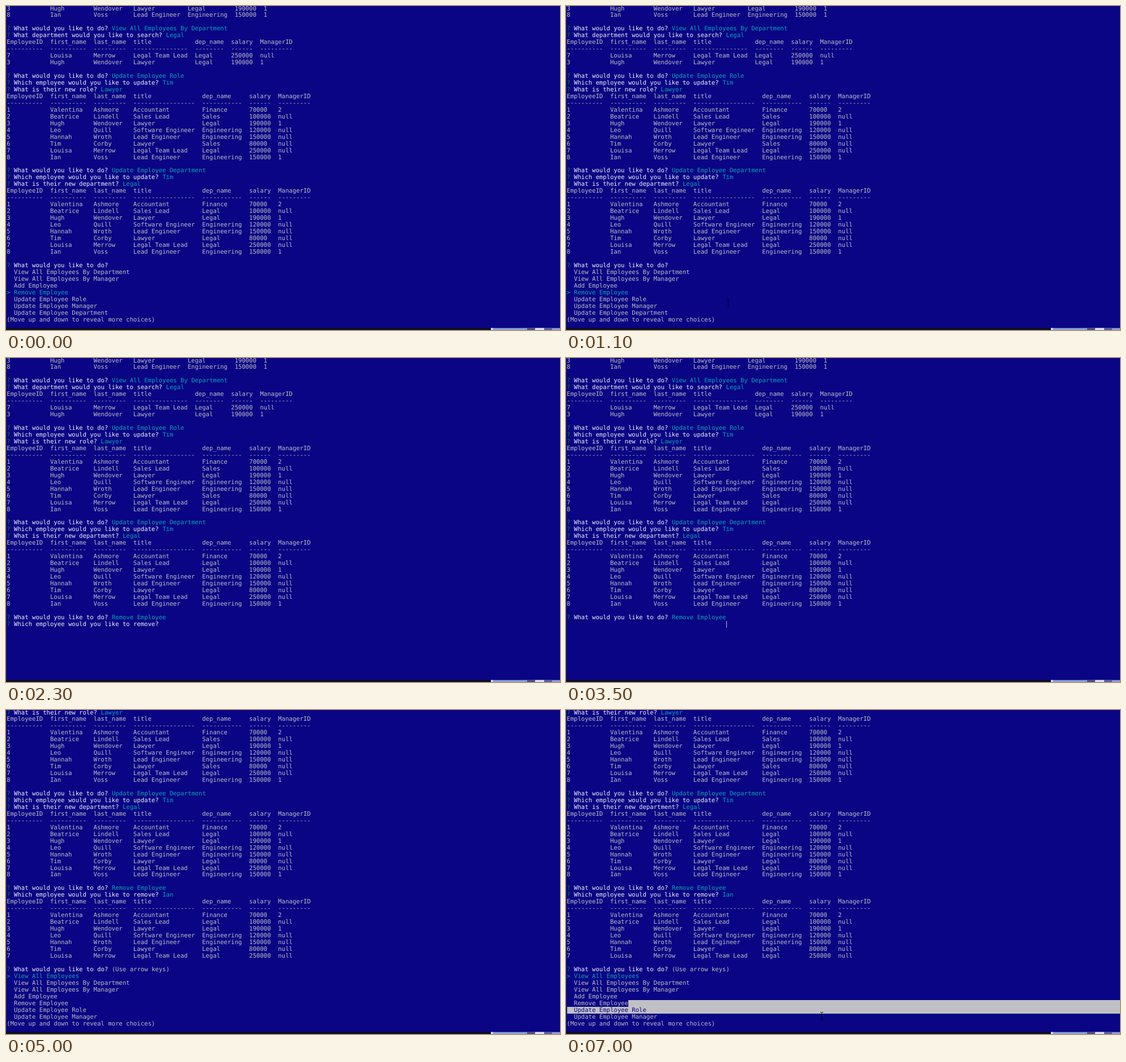
These frames come from a looping animation (978x573 px, 7100 ms). An HTML page with a canvas:

```html
<!DOCTYPE html>
<html lang="en">
<head>
<meta charset="utf-8">
<title>Employee tracker</title>
<style>
html, body { margin: 0; width: 978px; height: 573px; overflow: hidden; background: #090584; }
canvas { display: block; }
</style>
</head>
<body>
<canvas id="stage" width="978" height="573"></canvas>
<script>
const ctx = document.getElementById('stage').getContext('2d');
const W = 978, H = 573, LOOP = 7100;
const CELL = 6.393, ROW = 11.957, LEFT = 1.3, BASE = 7.5;
const BG = '#090584', GREY = '#c0c0c4', WHITE = '#f4f4f6', CYAN = '#08a6b8', GREEN = '#12803a';

// Each line is a list of [text, colour] runs.
const plain = text => [[text, GREY]];
const ask = (question, answer = '', colour = CYAN) =>
  [['? ', GREEN], [question + ' ', WHITE], [answer, colour]];
const TODO = 'What would you like to do?';
const REMOVE = 'Which employee would you like to remove?';

const HEAD = ['EmployeeID', 'first_name', 'last_name', 'title', 'dep_name', 'salary', 'ManagerID'];
const staff = [
  '1,Valentina,Ashmore,Accountant,Finance,70000,2',
  '2,Beatrice,Lindell,Sales Lead,Legal,100000,null',
  '3,Hugh,Wendover,Lawyer,Legal,190000,1',
  '4,Leo,Quill,Software Engineer,Engineering,120000,null',
  '5,Hannah,Wroth,Lead Engineer,Engineering,150000,null',
  '6,Tim,Corby,Lawyer,Legal,80000,null',
  '7,Louisa,Merrow,Legal Team Lead,Legal,250000,null',
  '8,Ian,Voss,Lead Engineer,Engineering,150000,1'
].map(row => row.split(','));
const earlier = staff.map(r =>
  r[0] === '2' || r[0] === '6' ? r.map((v, i) => i === 4 ? 'Sales' : v) : r);

function table(rows) {
  const widths = HEAD.map((h, i) => Math.max(h.length, ...rows.map(r => r[i].length)));
  const join = cells => plain(cells.map((c, i) => c.padEnd(widths[i])).join('  '));
  return [join(HEAD), join(widths.map(n => '-'.repeat(n))), ...rows.map(join), []];
}

const CHOICES = ['View All Employees', 'View All Employees By Department',
  'View All Employees By Manager', 'Add Employee', 'Remove Employee',
  'Update Employee Role', 'Update Employee Manager', 'Update Employee Department'];

function menu(first, chosen, hint) {
  return [
    ask(TODO, hint, GREY),
    ...CHOICES.slice(first, first + 7).map((c, i) =>
      i + first === chosen ? [['> ' + c, CYAN]] : plain('  ' + c)),
    plain('(Move up and down to reveal more choices)')
  ];
}

const history = [
  ...table([staff[2], staff[7]]).slice(2),
  ask(TODO, 'View All Employees By Department'),
  ask('What department would you like to search?', 'Legal'),
  ...table([staff[6], staff[2]]),
  ask(TODO, 'Update Employee Role'),
  ask('Which employee would you like to update?', 'Tim'),
  ask('What is their new role?', 'Lawyer'),
  ...table(earlier),
  ask(TODO, 'Update Employee Department'),
  ask('Which employee would you like to update?', 'Tim'),
  ask('What is their new department?', 'Legal'),
  ...table(staff)
];
const removing = [...history, ask(TODO, 'Remove Employee')];
const before = [...history, ...menu(1, 4, '')];
const after = [
  ...removing, ask(REMOVE, 'Ian'), ...table(staff.slice(0, 7)),
  ...menu(0, 0, '(Use arrow keys)')
].slice(-47);

function screen(t) {
  if (t < 1600) return before;
  if (t >= 4000) return after;
  if (t >= 3500 && t < 3600) return removing;
  const typed = t < 3600 ? '' : 'Ian'.slice(0, t < 3700 ? 1 : t < 3850 ? 2 : 3);
  return [...removing, ask(REMOVE, typed, GREY)];
}

function drawLine(runs, row, colour) {
  let col = 0;
  for (const [text, ink] of runs) {
    ctx.fillStyle = colour || ink;
    ctx.fillText(text, LEFT + col * CELL, BASE + row * ROW);
    col += text.length;
  }
}

function rect(colour, x, y, w, h) {
  ctx.fillStyle = colour;
  ctx.fillRect(x, y, w, h);
}

function drawSelection() {
  rect(GREY, 110, 513, W - 110, 12);
  rect(GREY, 2, 525, W - 2, 12);
  drawLine(after[44], 44, BG);
}

// Pointer keys: time, x, y.
const VISITS = [
  [[400, 330, 548], [1000, 286, 525], [1600, 286, 525]],
  [[5500, 250, 522], [5800, 400, 532], [6100, 433, 538], [6500, 442, 540],
   [6700, 446, 540], [7000, 451, 541], [7100, 451, 541]]
];

function pointerAt(t) {
  for (const keys of VISITS)
    for (let i = 1; i < keys.length; i++) {
      const [t0, x0, y0] = keys[i - 1], [t1, x1, y1] = keys[i];
      if (t >= t0 && t < t1) {
        const k = (t - t0) / (t1 - t0);
        return [x0 + (x1 - x0) * k, y0 + (y1 - y0) * k];
      }
    }
}

function drawPointer([x, y]) {
  x = Math.round(x);
  y = Math.round(y);
  rect('#05030f', x, y - 6, 1, 12);
  for (const end of [y - 7, y + 6]) {
    rect('#05030f', x - 2, end, 2, 1);
    rect('#05030f', x + 1, end, 2, 1);
  }
}

function drawDesktop() {
  rect('#23234a', 0, 0, 1, H);
  rect('#10121c', 0, 569.5, W, 4);
  rect('#8f9fdc', 856, 569.5, 122, 4);
  rect('#d5d9ee', 856, 569.5, 4, 4);
  rect('#4a4f86', 920, 569.5, 14, 4);
  rect('#dcdff0', 934, 569.5, 16, 4);
  rect('#5a5f98', 950, 569.5, 14, 4);
}

function draw(now) {
  const t = Math.floor(now % LOOP / 100) * 100;
  rect(BG, 0, 0, W, H);
  ctx.font = '10.62px "DejaVu Sans Mono", monospace';
  ctx.textRendering = 'geometricPrecision';
  screen(t).forEach((line, row) => drawLine(line, row));
  if (t >= 3500 && t < 4000) {
    const typed = t < 3700 ? 1 : t < 3850 ? 2 : 3;
    rect(GREY, Math.round(LEFT + (REMOVE.length + 3 + typed) * CELL), 465, 1, 12);
  }
  if (t >= 5800) drawSelection();
  drawDesktop();
  const pointer = pointerAt(t);
  if (pointer) drawPointer(pointer);
  requestAnimationFrame(draw);
}
requestAnimationFrame(draw);
</script>
</body>
</html>
```
